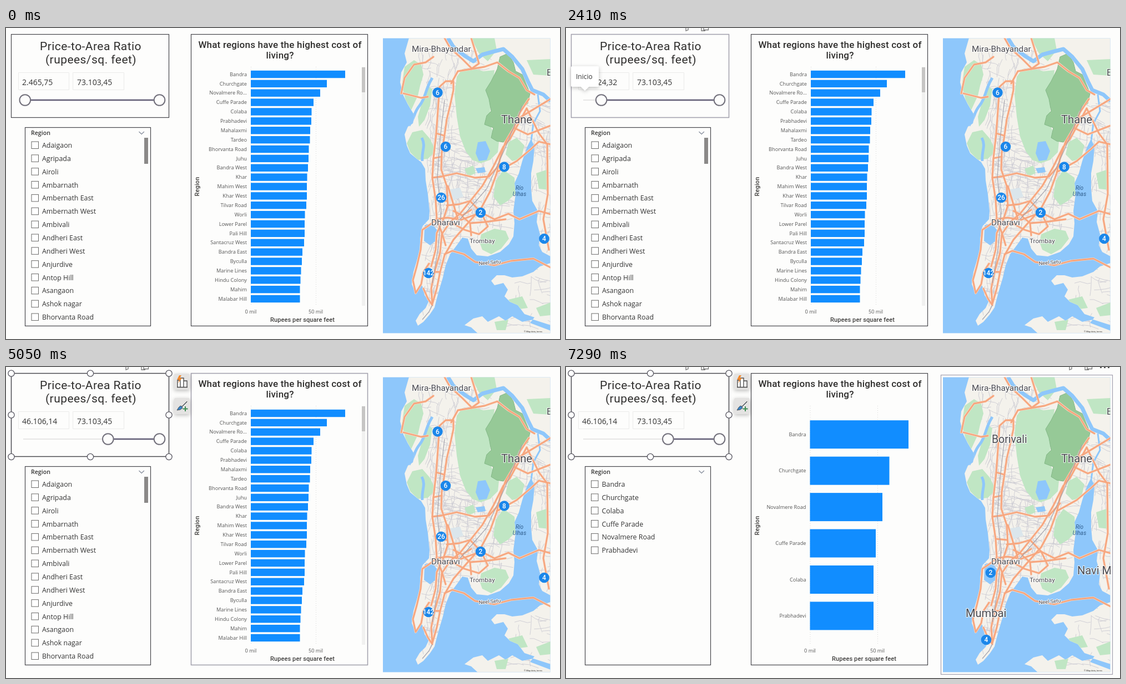
These frames come from a looping animation (998x561 px, 8000 ms). An HTML page:

```html
<!DOCTYPE html>
<html lang="en">
<head>
<meta charset="utf-8">
<title>Cost of living dashboard</title>
<style>
html, body { margin: 0; width: 100%; height: 100%; overflow: hidden; background: #fdfdfc; }
svg { display: block; width: 100vw; height: 100vh; }
text { font-family: "Open Sans", "Noto Sans", sans-serif; fill: #333; }
.din, .map text { font-family: Roboto, sans-serif; }
.din { font-weight: 500; fill: #2f2e2d; text-anchor: middle; }
.light { font-weight: 400; }
.axis { font-size: 11px; letter-spacing: .1px; fill: #403f3e; }
.item { font-size: 12.4px; }
.tick { font-size: 9.2px; fill: #555; }
.end { text-anchor: end; }
.mid { text-anchor: middle; }
.frame { fill: none; stroke: #46464c; stroke-width: 1.2; }
.soft { stroke: #a3a1b0; }
.map .place { fill: #4a4a50; stroke: #fff; stroke-width: 2.2px; stroke-opacity: .85; stroke-linejoin: round; paint-order: stroke; }
.river { fill: #2e5c8c; font-style: italic; font-size: 10px; text-anchor: middle; }
.pin text { fill: #fff; font-size: 12px; font-weight: 500; text-anchor: middle; }
.icon { fill: none; stroke: #777; stroke-width: 1.3; }

.anim { animation: 8s linear infinite both; }
.before { animation-name: before; }
.after { animation-name: after; }
.oldpins { animation-name: oldpins; }
.listbar { animation-name: listbar; }
.slicer { animation-name: slicer; }
.tip { animation-name: tip; }
.grip { animation-name: grip; }
.select { animation-name: select; }
.charthover { animation-name: charthover; }
.maphover { animation-name: maphover; }
.mapicons { animation-name: mapicons; }
.newplaces { animation-name: newplaces; }
.newpins { animation-name: newpins; }
@keyframes before { 0%, 65.5% { opacity: 1 } 65.6%, 100% { opacity: 0 } }
@keyframes after { 0%, 65.5% { opacity: 0 } 65.6%, 100% { opacity: 1 } }
@keyframes oldpins { 0%, 66% { opacity: 1 } 67.5%, 100% { opacity: 0 } }
@keyframes listbar { 0%, 69.5% { opacity: 1 } 73.5%, 100% { opacity: 0 } }
@keyframes slicer { 0%, 3% { opacity: 0 } 4.8%, 8.6% { opacity: 1 } 8.9%, 11.6% { opacity: 0 } 12.1%, 100% { opacity: 1 } }
@keyframes tip { 0%, 17.4% { opacity: 0 } 19.5%, 59% { opacity: 1 } 60%, 100% { opacity: 0 } }
@keyframes grip { 0%, 17.3% { opacity: 0 } 17.6%, 24% { opacity: 1 } 25%, 100% { opacity: 0 } }
@keyframes select { 0%, 59.2% { opacity: 0 } 60%, 100% { opacity: 1 } }
@keyframes charthover { 0%, 61% { opacity: 0 } 62.5%, 65.1% { opacity: 1 } 66.5%, 100% { opacity: 0 } }
@keyframes maphover { 0%, 1.25% { opacity: 0 } 2%, 3% { opacity: 1 } 4.5%, 65.3% { opacity: 0 } 67%, 100% { opacity: 1 } }
@keyframes mapicons { 0%, 1.25% { opacity: 0 } 2%, 3% { opacity: 1 } 4.5%, 70% { opacity: 0 } 72%, 100% { opacity: 1 } }
@keyframes newplaces { 0%, 75.3% { opacity: 0 } 80%, 100% { opacity: 1 } }
@keyframes newpins { 0%, 81% { opacity: 0 } 91%, 100% { opacity: 1 } }
</style>
</head>
<body>
<svg viewBox="0 0 998 561" preserveAspectRatio="none">
  <defs>
    <clipPath id="mapbox"><rect x="679" y="18.5" width="301.5" height="532"/></clipPath>
    <clipPath id="landclip"><use href="#land"/></clipPath>
    <filter id="shade" x="-30%" y="-30%" width="160%" height="170%">
      <feDropShadow dx="0" dy="2" stdDeviation="3.5" flood-color="#000" flood-opacity=".25"/>
    </filter>
    <path id="land" d="M726 18 722 32 718 46 722 62 712 80 710 98 716 122 724 138 736 158 733 172 724 178 718 192 722 212 728 226 740 236 748 242 755 254 756 275 760 300 763 330 762 345 750 358 746 380 746 400 740 420 734 440 731 462 738 478 744 470 748 462 752 470 754 482 762 492 756 505 745 516 738 528 742 537 752 530 764 516 772 504 776 488 781 470 787 450 792 428 800 408 812 392 822 378 832 380 838 398 848 410 868 412 890 404 906 390 914 376 916 352 914 330 918 300 916 280 924 262 930 240 938 216 946 200 952 214 950 240 946 262 946 290 948 312 958 330 956 350 962 372 960 392 966 404 981 412V18Z
      M981 424 962 430 950 440 930 448 912 450 898 446 884 446 874 456 880 464 896 460 904 472 898 484 908 494 922 500 934 516 952 522 944 532 981 546Z
      M850 551 838 540 826 536 842 524 858 520 868 530 888 520 900 528 912 520 930 530 950 526 981 536V551Z"/>
  </defs>

  <g class="map" clip-path="url(#mapbox)">
    <rect x="679" y="18" width="302" height="533" fill="#8ec7fb"/>
    <use href="#land" fill="#f4f2ec"/>
    <g clip-path="url(#landclip)">
      <path id="lanes" fill="none" stroke="#cccbd3" stroke-width=".9"/>
      <path fill="#c0e6c4" d="M718 70 735 58 748 66 752 84 746 104 742 122 730 148 720 130 713 104Z
        M722 208 732 188 750 184 764 200 774 222 760 236 742 238 728 224Z
        M758 104 768 110 764 140 754 166 744 178 742 160 750 132Z
        M812 88 822 74 845 74 860 78 880 76 876 110 872 150 874 180 888 206 886 224 872 238 855 244 840 238 828 222 818 196 812 160 808 120Z
        M838 18H880L884 40 868 60 852 46Z M938 58 981 56V86L950 84Z"/>
      <path fill="#c0e6c4" d="M905 206 920 198 934 212 928 236 912 240 900 228Z M955 262 976 255 978 292 960 290Z
        M882 276 896 256 916 270 918 298 904 312 890 320 878 304Z M856 372 880 362 900 366 906 380 892 398 874 408 858 400 853 386Z
        M905 490 930 484 940 505 918 508Z M955 505 981 495V518L962 520Z M880 530 905 526 900 545 884 545Z M826 254 842 248 846 262 832 268Z"/>
      <path fill="#96c997" stroke="#83b787" d="M885 74 890 52 904 46 914 62 918 78 930 84 944 118 940 136 926 148 920 170 912 186 896 206 884 204 874 198 878 180 862 174 866 158 874 150 870 128 864 112 874 96Z"/>
      <path fill="#dbe6ec" d="M795 292 818 288 824 304 802 312Z"/>
      <path fill="#8ec7fb" d="M850 206 864 204 872 222 866 238 852 240 846 226Z M846 253 862 251 864 260 850 262Z M754 356 766 352 778 366 776 382 764 392 753 384Z"/>
      <g fill="none" stroke="#8ec7fb" stroke-linejoin="round">
        <path stroke-width="5" d="M768 90C755 110 757 125 745 140S738 160 726 176M750 240C748 222 757 214 749 198"/>
        <path stroke-width="7" d="M796 18 806 34 826 50 842 60 858 48 880 42 896 38 912 52 930 74 940 96 948 112 968 120 981 132"/>
        <path stroke-width="3" d="M946 204 950 172 962 150 958 120"/>
      </g>
    </g>
    <g id="roads" fill="none" stroke-linejoin="round" stroke-linecap="round">
      <path d="M806 96 806 112 800 140 794 165 789 200 785 225 784 255 794 285 796 320 788 345 776 370 774 400 766 430
        M806 96 792 96 781 106 778 150 775 190 770 235 768 270 774 310 776 345
        M802 100 814 78 838 74 852 64 846 44 838 18 M712 118 718 90 735 66 756 62 770 52 M716 118 748 126 760 124"/>
      <path d="M790 18 800 36 822 56 838 72 M838 74 862 70 885 62 905 78 925 90 938 112 952 120
        M942 128 926 152 915 180 900 205 890 235 884 262 872 295 856 325 832 352 806 382 790 410 782 440 776 470 768 498
        M938 145 908 200 896 214 878 250 858 285 838 310 818 335 800 350 785 372 782 405 772 440 766 470 768 498"/>
      <path d="M784 268 812 262 845 270 870 268 890 246 M794 320 816 318 836 312 856 333 880 345 905 335 925 345 960 330 981 336
        M775 345 795 342 820 346 855 333 M836 352 862 350 900 345 M884 260 920 240 946 218 960 205 981 210
        M938 145 960 190 975 210 976 300 968 345 978 400 M915 180 940 192 981 176 M920 165 981 128"/>
      <path d="M776 345 762 356 750 364 747 400 740 430 733 455 738 478 748 462 752 440 762 425 M752 470 760 488 768 500
        M790 408 804 402 825 408 845 422 880 428 910 420 950 416 981 432 M768 270 784 268 M774 310 795 312 M772 440 782 440"/>
      <path d="M800 350 826 364 852 372 868 358 856 333 M806 330 822 338 838 328 M796 285 806 318 815 348
        M776 345 786 372 792 392 M822 340 836 352 838 374 M770 235 785 232 M775 190 789 194"/>
    </g>
    <path fill="none" stroke="#a5a3ac" stroke-width="1.2" d="M790 130 782 200 777 270 784 330 778 400 768 460M930 140 900 215 866 290 812 352M768 500 762 512 750 526"/>
    <g id="places"></g>
    <text class="river" x="925" y="292">Río</text><text class="river" x="925" y="303">Ulhas</text>
    <text x="933" y="549" font-size="4">© Map data, terms</text>
    <g id="newplaces" class="anim newplaces"></g>
    <g id="oldpins" class="pin anim oldpins"></g>
    <g id="newpins" class="pin anim newpins"></g>
  </g>
  <rect class="frame soft anim maphover" x="675.5" y="14.5" width="309" height="540"/>
  <g class="icon anim mapicons">
    <use href="#tools" x="691"/>
    <path d="M962 1h3m4 0h3m4 0h3" stroke="#555" stroke-width="2"/>
  </g>

  <rect class="frame" x="333.5" y="11.5" width="318" height="526"/>
  <rect class="frame soft anim charthover" x="333.5" y="11.5" width="318" height="526"/>
  <g font-size="17" letter-spacing=".2">
    <text class="din" x="493.5" y="36">What regions have the highest cost of</text>
    <text class="din" x="493.5" y="55">living?</text>
  </g>
  <text class="din axis" transform="translate(348 286) rotate(-90)">Region</text>
  <g id="many" class="anim before">
    <rect x="641" y="70" width="6" height="431" fill="#f1f1f0"/>
    <rect x="641" y="71" width="6" height="45" fill="#c6c5c4"/>
  </g>
  <g id="few" class="anim after"></g>

  <rect class="frame" x="34.5" y="179.5" width="226" height="358"/>
  <text x="45" y="193" font-size="10.6" font-weight="600">Region</text>
  <path d="M239.5 187l4.7 4.5 4.7-4.5" fill="none" stroke="#7c8494" stroke-width="1.1"/>
  <rect class="anim listbar" x="249" y="198" width="7" height="47" fill="#8b8988"/>
  <g id="listall" class="anim before"></g>
  <g id="listfew" class="anim after"></g>

  <rect class="frame" x="9.5" y="11.5" width="284" height="150"/>
  <g class="anim slicer">
    <rect class="frame soft" x="9.5" y="11.5" width="284" height="150"/>
    <path id="tools" class="icon" d="M216 0v5l4-1.5V0M244 0v5h7M248 0v3.5h8.5V0"/>
  </g>
  <g font-size="21" letter-spacing=".45">
    <text class="din light" x="152.5" y="40">Price-to-Area Ratio</text>
    <text class="din light" x="153" y="64">(rupees/sq. feet)</text>
  </g>
  <path d="M22.5 80.5h91v31h-91zM120.5 80.5h92v31h-92z" fill="none" stroke="#ebebea"/>
  <text id="low" x="29" y="102.5" font-size="14"></text>
  <text x="128" y="102.5" font-size="14">73.103,45</text>
  <path d="M31 130H276" stroke="#e7e6e6" stroke-width="2"/>
  <path id="track" stroke="#625e75" stroke-width="2.6"/>
  <g fill="#fdfdfc" stroke="#73717c" stroke-width="2">
    <circle cx="276.5" cy="130" r="9.8"/>
    <g id="knob">
      <circle cy="130" r="9.8"/>
      <circle class="anim grip" cy="130" r="9.8" stroke="#26252b"/>
    </g>
  </g>
  <g class="anim tip" filter="url(#shade)">
    <path d="M11 69H57q2 0 2 2V104q0 2-2 2H41l-7 7-7-7H11q-2 0-2-2V71q0-2 2-2z" fill="#fff"/>
    <text x="18" y="92" font-size="12">Inicio</text>
  </g>
  <g class="anim select">
    <rect class="frame" x="9.5" y="11.5" width="284" height="150" stroke="#55545e"/>
    <g id="dots" fill="#fff" stroke="#55545e" stroke-width="1.3"></g>
    <g filter="url(#shade)" fill="#e4e3e2">
      <rect x="303" y="12" width="28" height="29" rx="2"/>
      <rect x="303" y="56" width="28" height="29" rx="2"/>
    </g>
    <path d="M309 36V24h5v12M314 36V20h6v16M320 36V25h6v11M308 36.5h19" fill="#fff" stroke="#444" stroke-width="1.3"/>
    <path d="M312 15l-4 8h4l-2 6 7-9h-4l3-5z" fill="#f0872b"/>
    <path d="M326 62l-9 9-3-1-3 3-3 5 6-1 4-3-1-2 9-9z" fill="#3c83c4" stroke="#444" stroke-width=".8"/>
    <path d="M323 71v9M318.5 75.5h9" stroke="#3c8b54" stroke-width="2"/>
  </g>
</svg>
<script>
const $ = id => document.getElementById(id);
const add = (id, html) => $(id).insertAdjacentHTML('beforeend', html);

// Map: small streets are seeded random walks inside boxes [x, y, width, height, count]
let seed = 11;
const rnd = () => (seed = seed * 16807 % 2147483647) / 2147483647;
function lanes([x, y, w, h, n]) {
  let d = '';
  for (let i = 0; i < n; i++) {
    d += `M${(x + rnd() * w).toFixed(1)} ${(y + rnd() * h).toFixed(1)}`;
    const turn = rnd() < .5 ? 0 : 1.5;
    for (let k = 0; k < 3; k++) {
      const a = turn + rnd() * .9 - .3, r = 5 + rnd() * 9;
      d += `l${(Math.cos(a) * r).toFixed(1)} ${(Math.sin(a) * r).toFixed(1)}`;
    }
  }
  return d;
}
$('lanes').setAttribute('d', [
  [755, 90, 50, 130, 70], [757, 215, 85, 135, 150], [745, 350, 75, 140, 100],
  [840, 230, 70, 130, 65], [890, 130, 90, 90, 55], [950, 200, 30, 190, 40],
  [735, 30, 120, 50, 30], [880, 430, 100, 110, 25]
].map(lanes).join(''));

const ways = $('roads').innerHTML;
$('roads').innerHTML = `<g stroke="#fbdcc8" stroke-width="4.2">${ways}</g><g stroke="#f6a67f" stroke-width="2.8">${ways}</g>`;

const place = (id, list) => list.forEach(([name, x, y, size, turn = 0]) =>
  add(id, `<text class="place" font-size="${size}" transform="translate(${x} ${y}) rotate(${turn})">${name}</text>`));
place('places', [['Mira-Bhayandar', 731, 43, 15.3], ['Thane', 892, 172, 20.2], ['Dharavi', 766, 356, 15.5],
  ['Trombay', 835, 388, 11.7], ['Neel Setu', 852, 428, 9.3, -5], ['E', 974, 86, 17]]);
place('newplaces', [['Borivali', 767, 137, 19.4], ['Navi Mumbai', 921, 374, 20], ['Mumbai', 720, 451, 20.1]]);

const pins = (id, list) => list.forEach(([n, x, y]) =>
  add(id, `<circle cx="${x}" cy="${y}" r="9.3" fill="#1b87ea"/><text x="${x}" y="${y + 4.3}">${n}</text>`));
pins('oldpins', [[6, 777.5, 116.5], [6, 792, 214], [8, 897.5, 250.5], [26, 784, 306], [2, 855, 333], [4, 969.5, 380], [142, 761, 442]]);
pins('newpins', [[2, 765, 371], [4, 757, 492]]);

// Bar chart: names with the right end of each bar
function bars(id, rows, { x, y, step, h, fifty, title }) {
  let out = '';
  for (const [gx, label] of [[x, '0 mil'], [fifty, '50 mil']])
    out += `<path d="M${gx + .5} 70V501" stroke="#d6d6d6" stroke-dasharray="1 3"/>
      <text class="tick mid" x="${gx}" y="514.5">${label}</text>`;
  rows.forEach(([name, end], i) => {
    const c = y + i * step;
    out += `<rect x="${x}" y="${c - h / 2}" width="${end - x}" height="${h}" fill="#118dff"/>
      <text class="tick end" x="${x - 7}" y="${c + 3.2}">${name}</text>`;
  });
  add(id, out + `<text class="din axis" x="${title}" y="530">Rupees per square feet</text>`);
}
bars('many', [['Bandra', 611], ['Churchgate', 578], ['Novalmere Ro...', 566], ['Cuffe Parade', 554], ['Colaba', 550.5],
  ['Prabhadevi', 550], ['Mahalaxmi', 548], ['Tardeo', 547.5], ['Bhorvanta Road', 545.5], ['Juhu', 545],
  ['Bandra West', 544], ['Khar', 542.5], ['Mahim West', 542], ['Khar West', 542], ['Tilvar Road', 541],
  ['Worli', 538.5], ['Lower Parel', 538], ['Pali Hill', 538], ['Santacruz West', 537], ['Bandra East', 534],
  ['Byculla', 533], ['Marine Lines', 531.5], ['Hindu Colony', 530.5], ['Mahim', 529.5], ['Malabar Hill', 529.5]],
  { x: 441, y: 83.5, step: 16.875, h: 13.4, fifty: 558, title: 534 });
bars('few', [['Bandra', 617], ['Churchgate', 582.5], ['Novalmere Road', 570], ['Cuffe Parade', 558], ['Colaba', 554], ['Prabhadevi', 554]],
  { x: 439.5, y: 121.7, step: 65.45, h: 51, fifty: 561, title: 537 });

// Region list
const list = (id, x, names) => names.split(',').forEach((name, i) => {
  const y = 211 + i * 23.85;
  add(id, `<rect x="${x}" y="${y - 6}" width="12.5" height="12.5" fill="#fff" stroke="#6b6a69"/>
    <text class="item" x="${x + 19}" y="${y + 5}">${name}</text>`);
});
list('listall', 46, 'Adaigaon,Agripada,Airoli,Ambarnath,Ambernath East,Ambernath West,Ambivali,Andheri East,Andheri West,Anjurdive,Antop Hill,Asangaon,Ashok nagar,Bhorvanta Road');
list('listfew', 45.5, 'Bandra,Churchgate,Colaba,Cuffe Parade,Novalmere Road,Prabhadevi');

for (const x of [9.5, 152, 293.5])
  for (const y of [11.5, 86.5, 162])
    if (x !== 152 || y !== 86.5) add('dots', `<circle cx="${x}" cy="${y}" r="5.6"/>`);

// Slider drag: time in ms and chosen minimum
const MIN = 2465.75, MAX = 73103.45;
const drag = [[0, MIN], [1900, MIN], [2130, 4100], [2870, 22400], [3010, 24069.71], [3080, 24069.71],
  [3710, 38200], [3930, 40930.15], [3975, 40930.15], [4370, 45870], [4539, 45870], [4540, 46106.14], [8000, 46106.14]];
function valueAt(t) {
  const i = drag.findIndex(p => p[0] > t);
  const [t0, a] = drag[i - 1], [t1, b] = drag[i];
  return a + (b - a) * (t - t0) / (t1 - t0);
}
const money = v => v.toFixed(2).replace('.', ',').replace(/\d(?=(\d{3})+,)/g, '$&.');
function draw(t) {
  const v = valueAt(t), x = 34.3 + (v - MIN) / (MAX - MIN) * 242;
  $('knob').setAttribute('transform', `translate(${x.toFixed(2)} 0)`);
  $('track').setAttribute('d', `M${x.toFixed(2)} 130H276`);
  $('low').textContent = money(v);
}
let start;
function tick(now) {
  start ??= now;
  draw((now - start) % 8000);
  requestAnimationFrame(tick);
}
draw(0);
requestAnimationFrame(tick);
</script>
</body>
</html>
```
